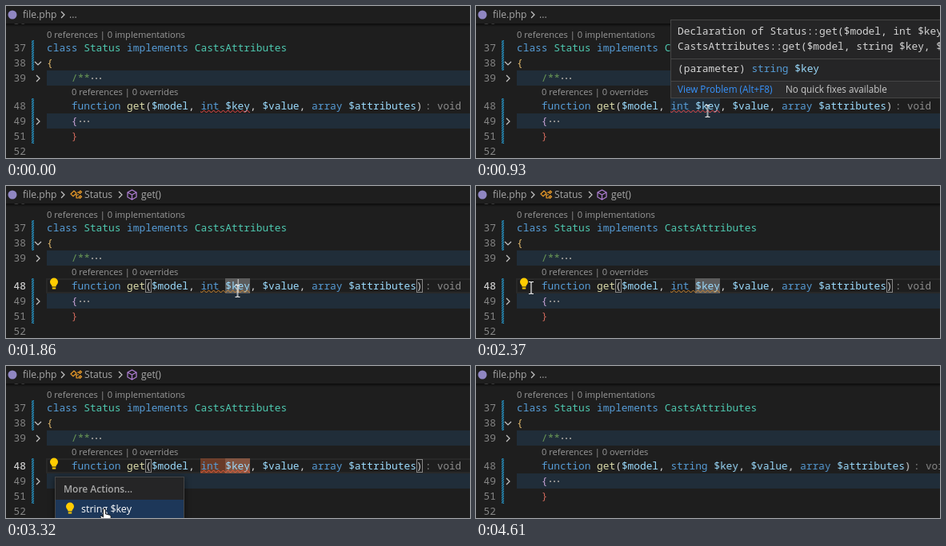
Recreate the animation shown at these times as an HTML page. Size 580x191 px, loop 5.42 s.

```html
<!DOCTYPE html>
<html lang="en">
<head>
<meta charset="utf-8">
<title>Quick fix in a code editor</title>
<style>
html, body { margin: 0; width: 100%; height: 100%; overflow: hidden; background: #1e1e1e; }
svg { display: block; width: 580px; height: 191px; }
text { white-space: pre; }
.code { font: 12.83px "Noto Sans Mono", monospace; fill: #d4d4d4; }
.num { fill: #858585; text-anchor: end; }
.lens { font: 11.1px "Open Sans", sans-serif; fill: #999; }
.ui { font: 12.1px "Open Sans", sans-serif; fill: #a9a9a9; }
.kw { fill: #569cd6; }
.type { fill: #4ec9b0; }
.fn { fill: #dcdcaa; }
.var { fill: #9cdcfe; }
.chevron { fill: none; stroke: #c5c5c5; stroke-width: 1.2; }
.dots { stroke: #8a8a8a; stroke-width: 2; stroke-dasharray: 2 3; }
.bracket { fill: none; stroke: #888; }

/* Every part shares one 5420 ms clock */
.fx { opacity: 0; animation: 5.42s step-end infinite; }
.focus { animation-name: focus; }
.pair { animation-name: pair; }
.path-short { animation-name: path-short; }
.path-full { animation-name: path-full; }
.hover { animation-name: hover; }
.word { animation-name: word; }
.fix-range { animation-name: fix-range; }
.menu { animation-name: menu; }
.bulb { animation-name: bulb; }
.caret { animation-name: caret; }
.old { animation-name: old; }
.new { animation-name: new; }
.tip { animation-name: tip; }
.ibeam { animation-name: ibeam; }
.arrow { animation-name: arrow; }
.hand { animation-name: hand; }
.click { animation-name: click; }
.tail { animation: tail 5.42s step-end infinite; }
.wave { animation: wave 5.42s step-end infinite; }
.mouse { animation: mouse 5.42s linear infinite; }

@keyframes focus { 26.18% { opacity: 1 } 82.1% { opacity: 0 } }
@keyframes pair { 28.41% { opacity: 1 } 82.1% { opacity: 0 } }
@keyframes path-short { 0% { opacity: 1 } 30.6% { opacity: 0 } 83.57% { opacity: 1 } to { opacity: 1 } }
@keyframes path-full { 30.6% { opacity: 1 } 83.57% { opacity: 0 } }
@keyframes hover { 14.93% { opacity: 1 } 26.18% { opacity: 0 } }
@keyframes word { 31.36% { opacity: 1 } 66.6% { opacity: 0 } }
@keyframes fix-range { 49.62% { opacity: .6 } 66.6% { opacity: 0 } }
@keyframes menu { 48.89% { opacity: 1 } 65.86% { opacity: 0 } }
@keyframes bulb { 31.36% { opacity: 1 } 66.6% { opacity: 0 } }
@keyframes caret {
  26.18% { opacity: 1 } 35.79% { opacity: 0 }
  45.2% { opacity: 1 } 47.41% { opacity: 0 }
  66.6% { opacity: 1 } 75.45% { opacity: 0 }
}
@keyframes old { 0% { opacity: 1 } 66.6% { opacity: 0 } }
@keyframes new { 66.6% { opacity: 1 } to { opacity: 1 } }
@keyframes tail { 0% { transform: none } 66.6%, to { transform: translateX(23.1px) } }
@keyframes wave { 0% { stroke: #f14c4c } 26.18% { stroke: #d08a34 } 49.62% { stroke: #f0603c } }
@keyframes tip {
  14.93% { opacity: .2 } 15.67% { opacity: .5 } 16.41% { opacity: .8 }
  17.15% { opacity: 1 } 26.18% { opacity: 0 }
}
@keyframes ibeam {
  8.85% { opacity: .5 } 9.58% { opacity: 1 } 45.2% { opacity: 0 }
  66.6% { opacity: 1 } 75.45% { opacity: .5 } 76.19% { opacity: 0 }
}
@keyframes arrow { 49.62% { opacity: 1 } 59.04% { opacity: 0 } }
@keyframes hand { 45.2% { opacity: 1 } 49.62% { opacity: 0 } 59.04% { opacity: 1 } 66.6% { opacity: 0 } }
@keyframes click {
  26.18% { opacity: .65 } 28.41% { opacity: 0 }
  47.41% { opacity: .65 } 48.89% { opacity: 0 }
  65.86% { opacity: .65 } 67.34% { opacity: 0 }
}
@keyframes mouse {
  0%, 36.53% { transform: translate(289.5px, 132px); animation-timing-function: ease-in }
  39.48% { transform: translate(200px, 141px) }
  41.51% { transform: translate(120px, 138px); animation-timing-function: ease-out }
  43.7% { transform: translate(69px, 128px) }
  45.94%, 52.58% { transform: translate(63px, 128px); animation-timing-function: ease-in-out }
  61.25%, to { transform: translate(123px, 180px) }
}
</style>
</head>
<body>
<svg viewBox="0 0 580 191">
  <defs>
    <pattern id="hatch" width="3" height="3" patternUnits="userSpaceOnUse">
      <path d="M-1 1L1-1M0 3L3 0M2 4L4 2" stroke="#2590c0" stroke-width="1.3"/>
    </pattern>
    <pattern id="squiggle" x="243" y="131" width="6" height="4" patternUnits="userSpaceOnUse">
      <path class="wave" d="M-1.5 0L1.5 3L4.5 0L7.5 3" fill="none" stroke="#f14c4c"/>
    </pattern>
    <linearGradient id="shade" x2="0" y2="1">
      <stop stop-color="#000" stop-opacity=".6"/>
      <stop offset="1" stop-color="#000" stop-opacity="0"/>
    </linearGradient>
    <g id="bulb" fill="#fc0">
      <path d="M-2.5 4.5Q-2.5 3-3.8 1.8A5 5 0 1 1 3.8 1.8Q2.5 3 2.5 4.5Z"/>
      <path d="M-2.2 5.5H2.2V7.5H-2.2Z"/>
    </g>
    <path id="right" class="chevron" d="M-2-4L2 0L-2 4"/>
  </defs>

  <rect width="580" height="191" fill="#1e1e1e"/>

  <!-- Line backgrounds and gutter -->
  <path d="M51 81H580V100H51ZM51 135H580V154H51Z" fill="#202d39"/>
  <rect class="fx focus" x="51" y="117" width="540" height="17" fill="none" stroke="#282828" stroke-width="2"/>
  <path d="M32 43h3v38h-3zM32 116h3v57h-3z" fill="url(#hatch)"/>
  <path class="chevron" d="M36 70L40 74L44 70"/>
  <use href="#right" x="40" y="91"/>
  <use href="#right" x="40" y="145"/>
  <g class="code">
    <g class="num">
      <text class="num" x="25" y="23">36</text>
      <text class="num" x="25" y="57">37</text>
      <text class="num" x="25" y="76">38</text>
      <text class="num" x="25" y="95">39</text>
      <text class="num" x="25" y="130">48</text>
      <text class="num" x="25" y="149">49</text>
      <text class="num" x="25" y="168">51</text>
      <text class="num" x="25" y="187">52</text>
      <text class="fx focus" x="25" y="130" fill="#d0d0d0">48</text>
    </g>
  </g>

  <!-- Highlights behind the signature -->
  <rect class="fx hover" x="243" y="116" width="62" height="19" fill="#264f78" fill-opacity=".3"/>
  <rect class="fx word" x="274" y="116" width="31" height="19" fill="#5c5c5c"/>
  <rect class="fx fix-range" x="243" y="116" width="62" height="19" fill="#9c4f30"/>

  <!-- Source text -->
  <text class="lens" x="51" y="40">0 references | 0 implementations</text>
  <text class="lens" x="82" y="112">0 references | 0 overrides</text>
  <g class="code">
    <text x="51" y="57"><tspan class="kw">class</tspan> <tspan class="type">Status</tspan> <tspan class="kw">implements</tspan> <tspan class="type">CastsAttributes</tspan></text>
    <text x="51" y="76" fill="#e2b86b">{</text>
    <text x="81.8" y="95" fill="#6a9955">/**</text>
    <text x="81.8" y="130"><tspan class="kw">function</tspan> <tspan class="fn">get</tspan>(<tspan class="var">$model</tspan>,</text>
    <text class="kw fx old" x="243.4" y="130">int</text>
    <text class="kw fx new" x="243.4" y="130">string</text>
    <text x="81.8" y="149" fill="#c9a3d6">{</text>
    <text x="81.8" y="168" fill="#d0695c">}</text>
    <g class="tail">
      <text x="274.2" y="130"><tspan class="var">$key</tspan>, <tspan class="var">$value</tspan>, <tspan class="kw">array</tspan> <tspan class="var">$attributes</tspan>)</text>
      <text x="524" y="130" font-size="12.5" fill="#8c8c8c" style="font-size:12.5px">: void</text>
      <rect class="bracket fx pair" x="513.5" y="117.5" width="7" height="16"/>
      <rect class="fx caret" x="289.5" y="117" width="1.5" height="17" fill="#aeafad"/>
    </g>
  </g>
  <path class="dots" d="M107 91h13M92 145h13"/>
  <rect class="bracket fx pair" x="174.5" y="117.5" width="7" height="16"/>
  <rect class="fx old" x="243" y="131" width="62" height="4" fill="url(#squiggle)"/>
  <g class="fx bulb"><use href="#bulb" x="60" y="122"/></g>

  <!-- Breadcrumb bar -->
  <rect width="580" height="22" fill="#1e1e1e"/>
  <rect y="22" width="580" height="4" fill="url(#shade)"/>
  <circle cx="8" cy="11" r="5.5" fill="#8f86c2"/>
  <g class="ui">
    <text x="21" y="15">file.php</text>
    <use href="#right" x="71" y="11"/>
    <text class="fx path-short" x="79" y="15">...</text>
    <g class="fx path-full">
      <g fill="none" stroke="#ee9d28" stroke-width="1.2">
        <path d="M81 10L85 6L88 9L84 13ZM87 11H91M89 8H92M88 11V15H91"/>
        <path d="M91 8l2-2 1.5 1.5-2 2zM91 14l2-2 1.5 1.5-2 2z"/>
      </g>
      <text x="98" y="15">Status</text>
      <use href="#right" x="143" y="11"/>
      <path d="M152 8L157.5 5L163 8V14L157.5 17L152 14ZM152 8L157.5 11L163 8M157.5 11V17" fill="none" stroke="#b180d7" stroke-width="1.2"/>
      <text x="169" y="15">get()</text>
    </g>
  </g>

  <!-- Problem tooltip -->
  <g class="fx tip">
    <rect x="243.5" y="17.5" width="345" height="98" fill="#252526" stroke="#454545"/>
    <rect x="244" y="95" width="340" height="20" fill="#2c2c2d"/>
    <path d="M244 66.5H580M244 94.5H580" stroke="#454545"/>
    <g class="code">
      <text x="252" y="36">Declaration of Status::get($model, int $key,</text>
      <text x="252" y="55">CastsAttributes::get($model, string $key, $value</text>
      <text x="252" y="83">(parameter) <tspan class="kw">string</tspan> <tspan class="var">$key</tspan></text>
    </g>
    <g class="ui" style="font-size:11.7px">
      <text x="252" y="109" fill="#3794ff">View Problem (Alt+F8)</text>
      <text x="387" y="109" fill="#ccc">No quick fixes available</text>
    </g>
  </g>

  <!-- Quick fix menu -->
  <g class="fx menu">
    <rect x="61.5" y="139.5" width="161" height="60" fill="#252526" stroke="#454545" style="filter:drop-shadow(0 2px 4px #0008)"/>
    <rect x="62" y="168" width="160" height="23" fill="#1d3759"/>
    <text class="ui" x="72" y="159" style="font-size:12px;font-weight:600">More Actions...</text>
    <use href="#bulb" x="80" y="178"/>
    <text class="ui" x="94" y="184" style="font-size:12.5px;fill:#fff">string $key</text>
  </g>

  <!-- Pointer -->
  <g class="mouse">
    <circle class="fx click" r="11.5" fill="#fe0"/>
    <path class="fx ibeam" d="M-3-7.5H-1L0-6.5L1-7.5H3M0-6.5V6.5M-3 7.5H-1L0 6.5L1 7.5H3" fill="none" stroke="#f4f4f4" stroke-width="1.2"/>
    <path class="fx arrow" d="M0 0V16L3.6 12.6L6 18L8.4 17L6 11.6H11Z" fill="#fff" stroke="#000" stroke-width=".8"/>
    <path class="fx hand" d="M-1.5 1a1.5 1.5 0 0 1 3 0V6l5 1.2q2 .6 1.7 2.6l-1 5.2H-1.5L-5 9.5q.2-2 2-.8l1.5 1.3Z" fill="#fff" stroke="#000" stroke-width=".8"/>
  </g>
</svg>
</body>
</html>
```
